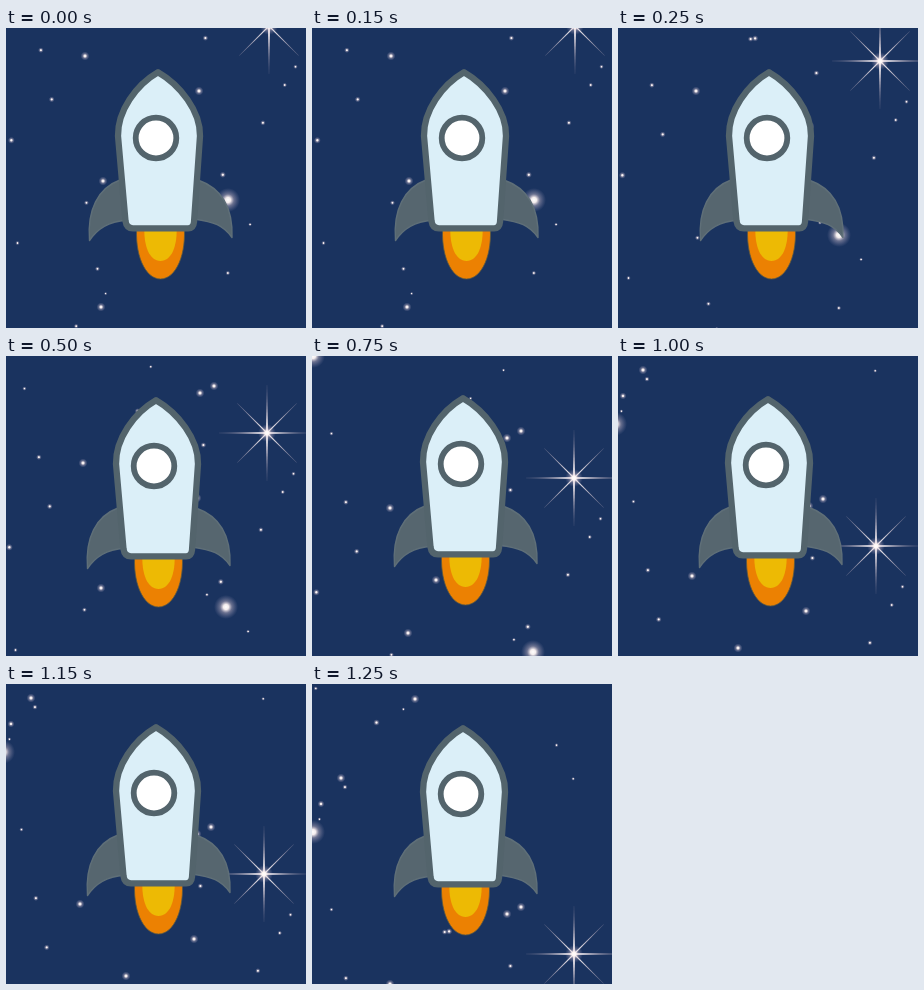
These frames come from a looping animation (300x300 px, 1.5 s). An HTML page:

```html
<!DOCTYPE html>
<html lang="en">
<head>
<meta charset="utf-8">
<title>Rocket</title>
<style>
html, body { margin: 0; width: 100%; height: 100%; overflow: hidden; background: #1a335f; }
svg { display: block; width: 100vw; height: 100vh; }
</style>
</head>
<body>
<svg viewBox="0 0 300 300">
  <defs>
    <radialGradient id="glow">
      <stop offset="0" stop-color="#fff"/>
      <stop offset=".22" stop-color="#fff6f4" stop-opacity=".95"/>
      <stop offset=".5" stop-color="#d8c6d2" stop-opacity=".42"/>
      <stop offset="1" stop-color="#a9a0c0" stop-opacity="0"/>
    </radialGradient>
    <radialGradient id="ray" gradientUnits="userSpaceOnUse" cx="0" cy="0" r="48">
      <stop offset="0" stop-color="#fff"/>
      <stop offset=".4" stop-color="#eadce2" stop-opacity=".75"/>
      <stop offset="1" stop-color="#b9a3b4" stop-opacity=".25"/>
    </radialGradient>
  </defs>
  <rect width="300" height="300" fill="#1a335f"/>
  <g id="sky"></g>
  <g id="rocket">
    <g stroke="#5b5a45" stroke-width=".8">
      <path d="M130 196C127 226 138 251 153.500 251S180 226 177 196Z" fill="#ec8102"/>
      <path d="M137.500 196C136 219 143 233 153.500 233S171 219 169.500 196Z" fill="#edba04" stroke="none"/>
    </g>
    <g fill="#56666f" stroke="#5f6f78" stroke-width="1.400" stroke-linejoin="round">
      <path d="M113 152C91 160 80 182 82.500 212.500C91 200 101 194 120 192Z"/>
      <path d="M191 152C214 160 226 179 225 209.500C216 197 207 194 187 191Z"/>
    </g>
    <path d="M151 44.300C129 57 110.500 83 111 108L118.500 193Q119.500 200.300 126 200.300H181Q186.500 200.300 187 194L193 108C193.500 83 173 57 151 44.300Z"
      fill="#dbeff8" stroke="#53646c" stroke-width="6.300" stroke-linejoin="round"/>
    <circle cx="149" cy="110" r="20.300" fill="#fff" stroke="#53646c" stroke-width="5.800"/>
  </g>
</svg>
<script>
const STEP = 250;
const poses = [
  { drop: 0, sway: 0, lift: 0 },
  { drop: 35, sway: -1, lift: 0 },
  { drop: 79, sway: -2, lift: 0 },
  { drop: 124, sway: -1, lift: 2 },
  { drop: 192, sway: -5, lift: 1 },
  { drop: 272, sway: -1, lift: 0 }
];
const brightStars = [
  [79, 28], [193, 63], [97, 153], [95, 279], [125, 100],
  [196, -42], [210, -49], [30, -178], [104, -257]
];
const halos = [[222, 172], [2, -124]];

const sky = document.getElementById("sky");
const rocket = document.getElementById("rocket");

function add(tag, attrs) {
  const node = document.createElementNS("http://www.w3.org/2000/svg", tag);
  for (const key in attrs) node.setAttribute(key, attrs[key]);
  sky.append(node);
}

function addGlow(cx, cy, r) {
  add("circle", { cx, cy, r, fill: "url(#glow)" });
}

function addSparkle(x, y) {
  for (let i = 0; i < 8; i++) {
    const diagonal = i % 2;
    const length = diagonal ? 42 : 48;
    const width = diagonal ? 0.7 : 1.1;
    add("path", {
      d: `M0 ${-width}L${length} -.2V.2L0 ${width}Z`,
      transform: `translate(${x} ${y}) rotate(${i * 45})`,
      fill: "url(#ray)"
    });
  }
  addGlow(x, y, 9);
}

function seededRandom(seed) {
  return () => (seed = (seed * 16807) % 2147483647) / 2147483647;
}

// Faint stars fill the tall sky in even bands, one per band.
function addFaintStars(count, top, bottom) {
  const random = seededRandom(2024);
  for (let i = 0; i < count; i++) {
    const x = 300 * random();
    const y = top + (bottom - top) * (i + random()) / count;
    addGlow(x, y, 1.5 + 2 * random());
  }
}

addFaintStars(30, -272, 300);
for (const [x, y] of brightStars) addGlow(x, y, 4.5);
for (const [x, y] of halos) addGlow(x, y, 12);
addSparkle(263, -2);

function place(node, x, y) {
  node.setAttribute("transform", `translate(${x} ${y})`);
}

function draw(time) {
  const { drop, sway, lift } = poses[Math.floor(time / STEP) % poses.length];
  place(sky, sway, drop);
  place(rocket, Math.max(sway + 1, -1), -lift);
}

const start = performance.now();
function tick() {
  draw(performance.now() - start);
  requestAnimationFrame(tick);
}
tick();
</script>
</body>
</html>
```
